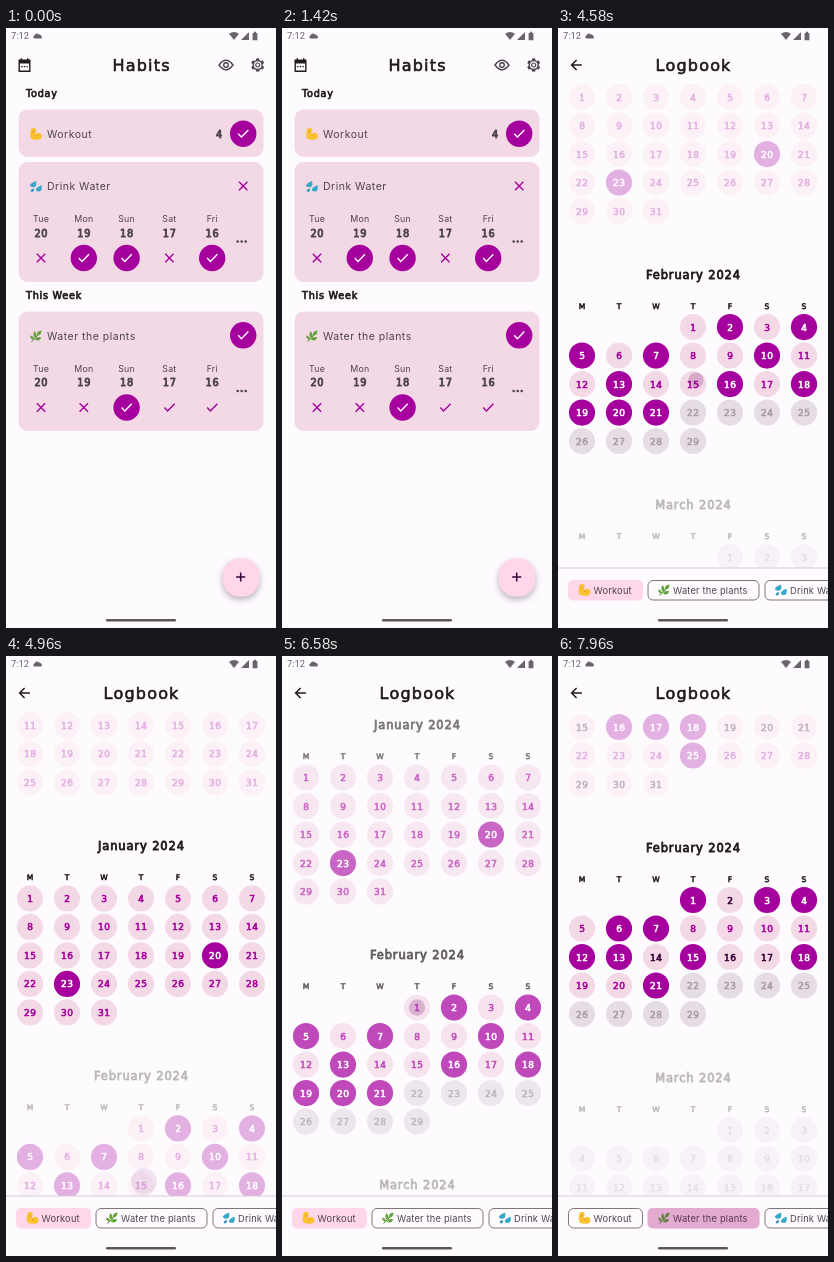
An HTML page with a canvas that plays this animation: 270 px wide and 600 px high, repeating every 8 s.

```html
<!DOCTYPE html>
<html lang="en">
<head>
<meta charset="utf-8">
<title>Habit tracker</title>
<style>
html, body { margin: 0; width: 100%; height: 100%; overflow: hidden; background: #fefbff; }
canvas { display: block; width: 270px; height: 600px; }
</style>
</head>
<body>
<canvas id="stage"></canvas>
<script>
const canvas = document.getElementById('stage');
const ctx = canvas.getContext('2d');
const ratio = window.devicePixelRatio || 1;
canvas.width = 270 * ratio;
canvas.height = 600 * ratio;

const LOOP = 8000;
const BG = '#fefbff', CARD = '#f3d9e5', PINK = '#ffd6ea', ACCENT = '#a5009d';
const INK = '#1e1a1d', SOFT_INK = '#4e444b';
const WIDE = '"DejaVu Sans", sans-serif', BODY = 'Inter, sans-serif';
const COLUMNS = [24, 61, 98, 135, 172, 209, 246];
const MONTH_HEIGHT = 230, FOCUS_TOP = 191.5;

const clamp = v => Math.max(0, Math.min(1, v));
const ramp = (t, start, length) => clamp((t - start) / length);
const smooth = p => p * p * (3 - 2 * p);
const channels = hex => [1, 3, 5].map(i => parseInt(hex.slice(i, i + 2), 16));
function mix(a, b, p) {
  const to = channels(b);
  return '#' + channels(a).map((v, i) =>
    Math.round(v + (to[i] - v) * p).toString(16).padStart(2, '0')).join('');
}

// Drawing helpers
function label(str, x, y, size = 10.5, spacing = 0.5, align = 'left') {
  ctx.font = `400 ${size}px ${BODY}`;
  ctx.letterSpacing = spacing + 'px';
  ctx.textAlign = align;
  ctx.fillStyle = SOFT_INK;
  ctx.fillText(str, x, y + size * 0.36);
}
// Wide display lettering, thickened with an outline
function display(str, x, y, size, color, { align = 'center', weight = 0.07 } = {}) {
  const spacing = size * 0.075;
  ctx.font = `400 ${size}px ${WIDE}`;
  ctx.letterSpacing = spacing + 'px';
  ctx.textAlign = align;
  ctx.fillStyle = ctx.strokeStyle = color;
  ctx.lineWidth = size * weight;
  ctx.lineJoin = 'round';
  const left = align === 'center' ? x + spacing / 2 : x;
  ctx.fillText(str, left, y + size * 0.36);
  ctx.strokeText(str, left, y + size * 0.36);
}

function circle(x, y, r, color) {
  ctx.fillStyle = color;
  ctx.beginPath();
  ctx.arc(x, y, r, 0, 7);
  ctx.fill();
}
function box(x, y, w, h, r) {
  ctx.beginPath();
  ctx.roundRect(x, y, w, h, r);
}
function fillBox(x, y, w, h, r, color) {
  box(x, y, w, h, r);
  ctx.fillStyle = color;
  ctx.fill();
}
function line(path, x, y, color, width = 1.4) {
  ctx.save();
  ctx.translate(x, y);
  ctx.lineJoin = 'miter';
  ctx.strokeStyle = color;
  ctx.lineWidth = width;
  ctx.stroke(new Path2D(path));
  ctx.restore();
}
function shape(path, x, y, color) {
  ctx.save();
  ctx.translate(x, y);
  ctx.fillStyle = color;
  ctx.fill(new Path2D(path));
  ctx.restore();
}
function ring(x, y, r, color, width) {
  line(`M${r} 0A${r} ${r} 0 1 1-${r} 0A${r} ${r} 0 1 1 ${r} 0`, x, y, color, width);
}

const CHECK = 'M-5 0L-1.8 3.4L5.2-3.8';
const CROSS = 'M-4.2-4.2L4.2 4.2M4.2-4.2L-4.2 4.2';
function mark(kind, x, y) {
  if (kind === 'done') circle(x, y, 13.2, ACCENT);
  line(kind === 'cross' ? CROSS : CHECK, x, y, kind === 'done' ? '#ffffff' : ACCENT, 1.4);
}

const emoji = {
  arm(x, y) {
    shape('M-4.5-5.7L-.8-5.9L.6-3.2L-1-2L-.8 .6Q2-2.6 5.2 0Q7 3.5 4.2 5.2Q-1 6.8-5 4.4Q-6.8 0-4.5-5.7Z', x, y, '#fbc12f');
    line('M-1-2Q-3-1-3.5-3M-.8 .6Q0 1.8 1.5 2', x, y, '#d98d17', 0.8);
  },
  drops(x, y) {
    shape('M1-5.5Q2.5 .5-1.5 .8Q-5.8 .5-4.8-2Q-3.5-3.8 1-5.5Z', x - 1, y, '#36a9c9');
    shape('M5.5-1.5Q6.8 4.5 3 5Q-1 4.8 .2 2Q1.5 .2 5.5-1.5Z', x, y, '#36a9c9');
    shape('M-2 2Q-1.8 5.2-3.8 5.4Q-6 5-5 3.4Q-4 2.4-2 2Z', x, y, '#2c94b8');
  },
  herb(x, y) {
    line('M-4.5 5.5Q0 2 3-3', x, y, '#4f7f2a', 1);
    shape('M5.5-5.5Q0-5 1 0Q5.5-1 5.5-5.5ZM-1.5-5Q-4-1-1 2Q2-1-1.5-5ZM-6-.5Q-5.5 4-2 3.6Q-2 0-6-.5ZM5.5 1.5Q0 0-1 3.5Q3 6 5.5 1.5Z', x, y, '#62a33a');
  }
};

function systemBars() {
  const gray = '#68646a';
  ctx.font = '400 9.3px Roboto, sans-serif';
  ctx.letterSpacing = '0px';
  ctx.textAlign = 'left';
  ctx.fillStyle = gray;
  ctx.fillText('7:12', 5, 11.4);
  shape('M-3.5 2.5Q-6 1-3.6-.5Q-2-4 1.3-1.4Q5 0 3.5 2.5Z', 32, 8, gray);
  shape('M-5-2.2Q0-6 5-2.2L0 4Z', 228, 8, gray);
  shape('M4-4V4H-4Z', 239, 8, gray);
  shape('M-2.4-3H-1V-4.2H1V-3H2.4V4.2H-2.4Z', 249, 8, gray);
  fillBox(100, 591, 70, 2.6, 1.3, '#5c575b');
}

const pageTitle = str => display(str, 135, 37.7, 16, INK, { weight: 0.04 });

// Habits screen
function gear(x, y) {
  for (let i = 0; i < 6; i++) {
    const a = i * Math.PI / 3 + Math.PI / 6, c = Math.cos(a), s = Math.sin(a);
    line(`M${c * 4.4} ${s * 4.4}L${c * 6.6} ${s * 6.6}`, x, y, SOFT_INK, 3.2);
  }
  ring(x, y, 4.5, SOFT_INK, 1.4);
  ring(x, y, 2, SOFT_INK, 1.2);
}

function calendarIcon(x, y) {
  line('M-5.3-5H5.3V6H-5.3ZM-3.2-7V-4M3.2-7V-4', x, y, INK, 1.4);
  shape('M-5.5-5H5.5V-1.8H-5.5Z', x, y, INK);
  for (let i = -1; i <= 1; i++) shape('M-.7 .6H.7V2H-.7Z', x + i * 2.6, y, INK);
}

function card(y, height, icon, name) {
  fillBox(12.5, y, 245, height, 9, CARD);
  emoji[icon](30, y + 24.5);
  label(name, 41, y + 24.5);
}

function weekRow(y, marks) {
  ['Tue', 'Mon', 'Sun', 'Sat', 'Fri'].forEach((day, i) => {
    const x = 35 + i * 42.8;
    label(day, x, y, 8.8, 0.2, 'center');
    display(String(20 - i), x, y + 14, 9.8, SOFT_INK, { weight: 0.09 });
    mark(marks[i], x, y + 39);
  });
  for (let i = -1; i <= 1; i++) circle(235.7 + i * 4, y + 22.5, 1.3, SOFT_INK);
}

function habitsScreen() {
  calendarIcon(18.5, 37.3);
  pageTitle('Habits');
  line('M-7 0Q0-9.4 7 0Q0 9.4-7 0Z', 220, 37, SOFT_INK, 1.4);
  ring(220, 37, 2.3, SOFT_INK, 1.4);
  gear(251.7, 37);

  display('Today', 20, 66, 9.7, INK, { align: 'left' });
  card(81.5, 47.5, 'arm', 'Workout');
  display('4', 213, 106, 9.8, SOFT_INK, { weight: 0.09 });
  mark('done', 237.2, 105.7);

  card(134, 120, 'drops', 'Drink Water');
  mark('cross', 237.2, 158);
  weekRow(191, ['cross', 'done', 'done', 'cross', 'done']);

  display('This Week', 20, 267.5, 9.7, INK, { align: 'left' });
  card(283.5, 119.5, 'herb', 'Water the plants');
  mark('done', 237.2, 307.3);
  weekRow(340.5, ['cross', 'cross', 'done', 'check', 'check']);

  ctx.save();
  ctx.shadowColor = 'rgba(60,40,60,.35)';
  ctx.shadowBlur = 6 * ratio;
  ctx.shadowOffsetY = 3 * ratio;
  fillBox(216.5, 530.5, 37, 38, 17, PINK);
  ctx.restore();
  line('M-4.5 0H4.5M0-4.5V4.5', 234.7, 549, '#380038', 1.5);
}

// Logbook screen: first is the weekday column of day 1, position counts months from February
const MONTHS = [
  { name: 'December 2023', first: 4, days: 31, position: -2 },
  { name: 'January 2024', first: 0, days: 31, position: -1 },
  { name: 'February 2024', first: 3, days: 29, position: 0 },
  { name: 'March 2024', first: 4, days: 31, position: 1 }
];
const LOG = {
  workout: { '-1': [20, 23], 0: [2, 4, 5, 7, 10, 13, 16, 18, 19, 20, 21] },
  plants: { '-1': [16, 17, 18, 25], 0: [1, 3, 4, 6, 7, 12, 13, 15, 18, 21] }
};
// Cell fill and number colour
const CELLS = {
  open: [CARD, ACCENT],
  rest: [CARD, '#380038'],
  done: [ACCENT, '#ffffff'],
  future: ['#e6dde4', '#a59ea5']
};

const scrollAt = t => MONTH_HEIGHT * (smooth(ramp(t, 4390, 600)) - smooth(ramp(t, 6268, 600)));

function dayState(log, month, day) {
  if (month.position > 0 || (month.position === 0 && day > 21)) return 'future';
  const done = log[month.position] || [];
  if (done.includes(day)) return 'done';
  if (log !== LOG.plants) return 'open';
  // A week with three entries needs no more
  const monday = day - (day - 1 + month.first) % 7;
  const inWeek = done.filter(d => d >= monday && d < monday + 7).length;
  const runsOver = month.position === -1 && monday === 29;
  return inWeek >= 3 || runsOver ? 'rest' : 'open';
}

function drawMonth(month, log, scroll) {
  const top = FOCUS_TOP + month.position * MONTH_HEIGHT + scroll;
  if (top > 560 || top < -190) return;
  const opacity = 1 - 0.7 * clamp((Math.abs(top - FOCUS_TOP) - 70) / 90);
  const shade = color => mix(BG, color, opacity);
  display(month.name, 135, top, 11.5, shade(INK));
  [...'MTWTFSS'].forEach((letter, i) => display(letter, COLUMNS[i], top + 31.5, 7.6, shade(INK)));
  for (let day = 1; day <= month.days; day++) {
    const cell = day - 1 + month.first;
    const x = COLUMNS[cell % 7], y = top + 52.5 + Math.floor(cell / 7) * 28.5;
    const [fill, number] = CELLS[dayState(log, month, day)];
    circle(x, y, 13.1, shade(fill));
    display(String(day), x, y + 0.3, 9, shade(number));
  }
}

function ripple(x, y, r, alpha) {
  if (alpha > 0 && r > 0) circle(x, y, r, `rgba(120,0,115,${alpha})`);
}

function chip(x, width, icon, name, selected) {
  if (selected) {
    fillBox(x, 552, width, 20.5, 5, PINK);
  } else {
    box(x + 0.5, 552.5, width - 1, 19.5, 5);
    ctx.strokeStyle = '#80747b';
    ctx.lineWidth = 1;
    ctx.stroke();
  }
  emoji[icon](x + 16.5, 562);
  label(name, x + 25.5, 562.3, 9.3, 0.2);
}

function logbookScreen(t) {
  const plants = t >= 7760;
  const log = plants ? LOG.plants : LOG.workout;
  const scroll = scrollAt(t);

  ctx.save();
  ctx.beginPath();
  ctx.rect(0, 55, 270, 485);
  ctx.clip();
  MONTHS.forEach(month => drawMonth(month, log, scroll));
  ripple(138, 297 + scroll, 2 + 11 * ramp(t, 4400, 350), 0.22 * ramp(t, 4400, 80) * (1 - ramp(t, 4750, 375)));
  ripple(135, 244 + scroll, 13.1 * ramp(t, 6330, 400), 0.22 * (1 - ramp(t, 6780, 375)));
  ctx.restore();

  line('M5.3 0H-4.8M0-5L-5 0L0 5', 18.6, 37, INK, 1.5);
  pageTitle('Logbook');

  fillBox(0, 539.5, 270, 1, 0, '#d6ced5');
  chip(10, 75, 'arm', 'Workout', !plants);
  chip(89.5, 112, 'herb', 'Water the plants', plants);
  chip(206.5, 92, 'drops', 'Drink Water', false);
  ctx.save();
  box(89.5, 552, 112, 20.5, 5);
  ctx.clip();
  ripple(145.5, 562, 62 * ramp(t, 7700, 240), 0.2 * ramp(t, 7700, 100));
  ctx.restore();
}

function draw(t) {
  ctx.setTransform(ratio, 0, 0, ratio, 0, 0);
  ctx.globalAlpha = 1;
  fillBox(0, 0, 270, 600, 0, BG);
  const fade = smooth(ramp(t, 1730, 600));
  if (fade < 1) habitsScreen();
  if (fade > 0) {
    ctx.globalAlpha = fade;
    fillBox(0, 0, 270, 600, 0, BG);
    logbookScreen(t);
    ctx.globalAlpha = 1;
  }
  systemBars();
}

function frame() {
  draw(performance.now() % LOOP);
  requestAnimationFrame(frame);
}
frame();
</script>
</body>
</html>
```
